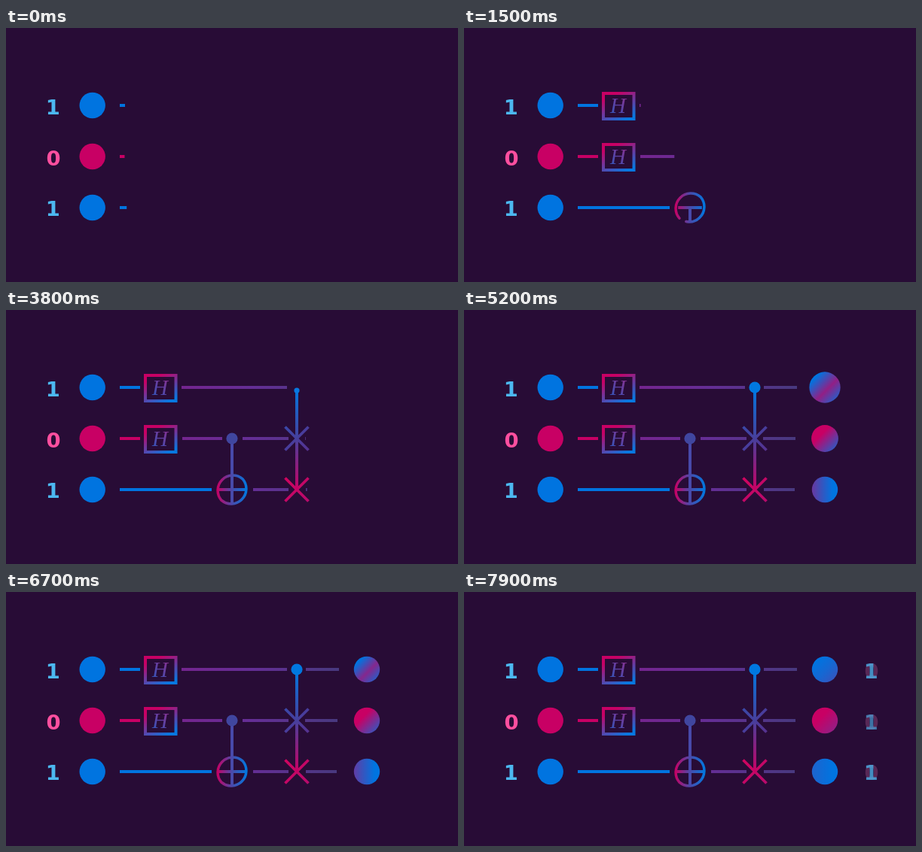
Animation, 600 px wide and 338 px high, one loop 8 s. Source, as an HTML page:

```html
<!DOCTYPE html>
<html lang="en">
<head>
<meta charset="utf-8">
<title>Quantum circuit</title>
<style>
  html, body { margin: 0; width: 100%; height: 100%; overflow: hidden; background: #280c36; }
  svg { display: block; width: 100vw; height: 100vh; }
  .digit { font: bold 27.4px "DejaVu Sans", sans-serif; text-anchor: middle; }
  .gate { font: italic 29px "Liberation Serif", serif; text-anchor: middle; }
</style>
</head>
<body>
<svg id="stage" viewBox="0 0 600 338"><defs id="defs"></defs></svg>
<script>
const LOOP = 8000;
const BLUE = [0, 116, 224], PINK = [200, 0, 100];
const ROWS = [103, 171, 239];
const stage = document.getElementById('stage');
const defs = document.getElementById('defs');
const parts = [];

const rgb = c => `rgb(${c.map(Math.round)})`;
const mix = (a, b, k) => rgb(a.map((v, i) => v + (b[i] - v) * k));
const clamp = v => Math.min(1, Math.max(0, v));
const ease = p => p < .5 ? 4 * p ** 3 : 1 - 4 * (1 - p) ** 3;
const span = (t, start, end) => clamp((t - start) / (end - start));

function add(tag, attrs, parent = stage) {
  const el = document.createElementNS('http://www.w3.org/2000/svg', tag);
  for (const k in attrs) el.setAttribute(k, attrs[k]);
  parent.appendChild(el);
  return el;
}

function gradient(id, [x1, y1, x2, y2], stops, units = 'userSpaceOnUse') {
  const g = add('linearGradient', { id, x1, y1, x2, y2, gradientUnits: units }, defs);
  return stops.map(([offset, color]) => add('stop', { offset, 'stop-color': color }, g));
}

function text(cls, x, y, str, fill) {
  const el = add('text', { class: cls, x, y, fill });
  el.textContent = str;
  return el;
}

// A stroke that draws itself from start to end
function trace(d, stroke, start, end, width = 4, cap = 'butt') {
  const el = add('path', {
    d, stroke, fill: 'none', pathLength: 1,
    'stroke-width': width, 'stroke-linecap': cap
  });
  parts.push(t => {
    const p = ease(span(t, start, end));
    el.setAttribute('visibility', p > 0 ? 'visible' : 'hidden');
    el.setAttribute('stroke-dasharray', p < 1 ? `${p} 2` : 'none');
  });
}

const wire = (x1, x2, y, color, start, end) =>
  trace(`M${x1} ${y}H${x2}`, color, start, end);

// A dot that grows past its size and settles
function pop(x, y, r, over, fill, start, peak, end) {
  const el = add('circle', { cx: x, cy: y, fill });
  parts.push(t => {
    const up = Math.sin(span(t, start, peak) * Math.PI / 2);
    const back = ease(span(t, peak, end));
    el.setAttribute('r', r * (up * over + (1 - over) * back));
  });
}

gradient('box', [.2, 0, .8, 1], [[.1, rgb(PINK)], [1, '#0878e0']], 'objectBoundingBox');
gradient('letter', [.8, 0, .2, 1], [[0, '#8f2d8c'], [1, '#2f58be']], 'objectBoundingBox');
gradient('ring', [280, 0, 320, 0], [[0, rgb(PINK)], [.5, '#4a4aaa'], [1, '#0078e0']]);
gradient('wire', [233, 0, 440, 0], [[0, '#74258f'], [.45, '#642e95'], [1, '#48397f']]);
gradient('swap', [0, 103, 0, 239], [[0, '#0078e0'], [.5, '#46409c'], [1, '#c80064']]);
gradient('crossA', [371, 156, 401, 186], [[0, '#3a48a8'], [1, '#563290']]);
gradient('crossB', [371, 224, 401, 254], [[0, '#d0045f'], [1, '#b80a6c']]);

// Input column
[['1', '#4cb8f0', 114.7], ['0', '#ff4f9f', 182.6], ['1', '#4cb8f0', 250.2]]
  .forEach(([s, color, base], i) => {
    text('digit', s === '1' ? 62.3 : 63, base, s, color);
    add('circle', { cx: 114.7, cy: ROWS[i], r: 17.2, fill: rgb(i === 1 ? PINK : BLUE) });
  });

// First wires and H gates
wire(151, 178, 103, rgb(BLUE), -300, 450);
wire(151, 178, 171, rgb(PINK), -300, 470);
wire(151, 273, 239, rgb(BLUE), -300, 830);
[[103, 450], [171, 350]].forEach(([y, start]) => {
  trace(`M185 ${y - 16}h40.5v34h-40.5z`, 'url(#box)', start, start + 650);
  const h = text('gate', 204.5, y + 10, 'H', 'url(#letter)');
  parts.push(t => h.setAttribute('opacity', span(t, start + 350, start + 700)));
});
wire(233, 373, 103, 'url(#wire)', 1380, 2240);
wire(234, 287, 171, 'url(#wire)', 1100, 1700);

// Controlled NOT
trace('M300 259V171', '#484aaa', 1250, 1900);
trace('M300 239H280', 'url(#ring)', 1000, 1800);
trace('M300 239H320', 'url(#ring)', 1000, 1800);
trace('M285.9 253.1A20 20 0 0 1 314.1 224.9A20 20 0 0 1 285.9 253.1',
  'url(#ring)', 850, 1750, 3.5, 'round');
pop(300, 171, 7.6, 1.3, '#40469f', 1850, 2100, 2350);
wire(314, 375, 171, 'url(#wire)', 1950, 2550);
wire(328, 375, 239, 'url(#wire)', 1900, 2500);

// Controlled swap
[[171, 'crossA', 2400], [239, 'crossB', 2300]].forEach(([y, id, start]) => {
  trace(`M370.5 ${y - 15.5}l31 31`, `url(#${id})`, start, start + 450, 3.8);
  trace(`M401.5 ${y - 15.5}l-31 31`, `url(#${id})`, start + 150, start + 600, 3.8);
});
trace('M386 239V103', 'url(#swap)', 2800, 4045);
const head = add('circle', { cx: 386, r: 3.6, fill: '#0878e0' });
parts.push(t => {
  const p = ease(span(t, 2800, 4045));
  head.setAttribute('cy', 239 - 136 * p);
  head.setAttribute('opacity', span(t, 3500, 3700));
});
pop(386, 103, 7.6, 1.3, '#0078e0', 3900, 4250, 4700);
wire(398, 442, 103, 'url(#wire)', 4000, 4650);
wire(397, 440, 171, 'url(#wire)', 3700, 4300);
wire(398, 439, 239, 'url(#wire)', 3670, 4270);

// Output qubits, their colours swinging between the two states
const outStops = [
  gradient('out0', [.15, .15, .85, .85], [[.05], [.6], [1]], 'objectBoundingBox'),
  gradient('out1', [.15, .15, .85, .85], [[.3], [1]], 'objectBoundingBox'),
  gradient('out2', [0, .5, 1, .5], [[0], [.8]], 'objectBoundingBox')
];
parts.push(t => {
  const a = .5 + .5 * Math.cos((t - 5050) / 1900 * 2 * Math.PI);
  const colors = [
    [rgb(BLUE), mix(BLUE, PINK, .12 + .65 * a), mix(BLUE, PINK, .25)],
    [rgb(PINK), mix(PINK, BLUE, .25 + .5 * a)],
    [mix(BLUE, PINK, .15 + .4 * a), rgb(BLUE)]
  ];
  colors.forEach((row, i) => row.forEach((c, j) => outStops[i][j].setAttribute('stop-color', c)));
});
ROWS.forEach((y, i) => {
  const start = 4900 - 150 * i;
  pop(479, y, 17.2, 1.2, `url(#out${i})`, start, start + 300, start + 540);
});

// Results fading in as both values at once
[[114.7, .75], [182.6, .6], [250.2, .75]].forEach(([base, strength]) => {
  const zero = text('digit', 541, base, '0', '#c86aa0');
  const one = text('digit', 540.3, base, '1', '#4cb8f0');
  parts.push(t => {
    const p = span(t, 7550, 7900);
    zero.setAttribute('opacity', .3 * p);
    one.setAttribute('opacity', strength * p);
  });
});

const origin = performance.now();
function draw() {
  const t = (performance.now() - origin) % LOOP;
  parts.forEach(update => update(t));
  requestAnimationFrame(draw);
}
draw();
</script>
</body>
</html>
```
